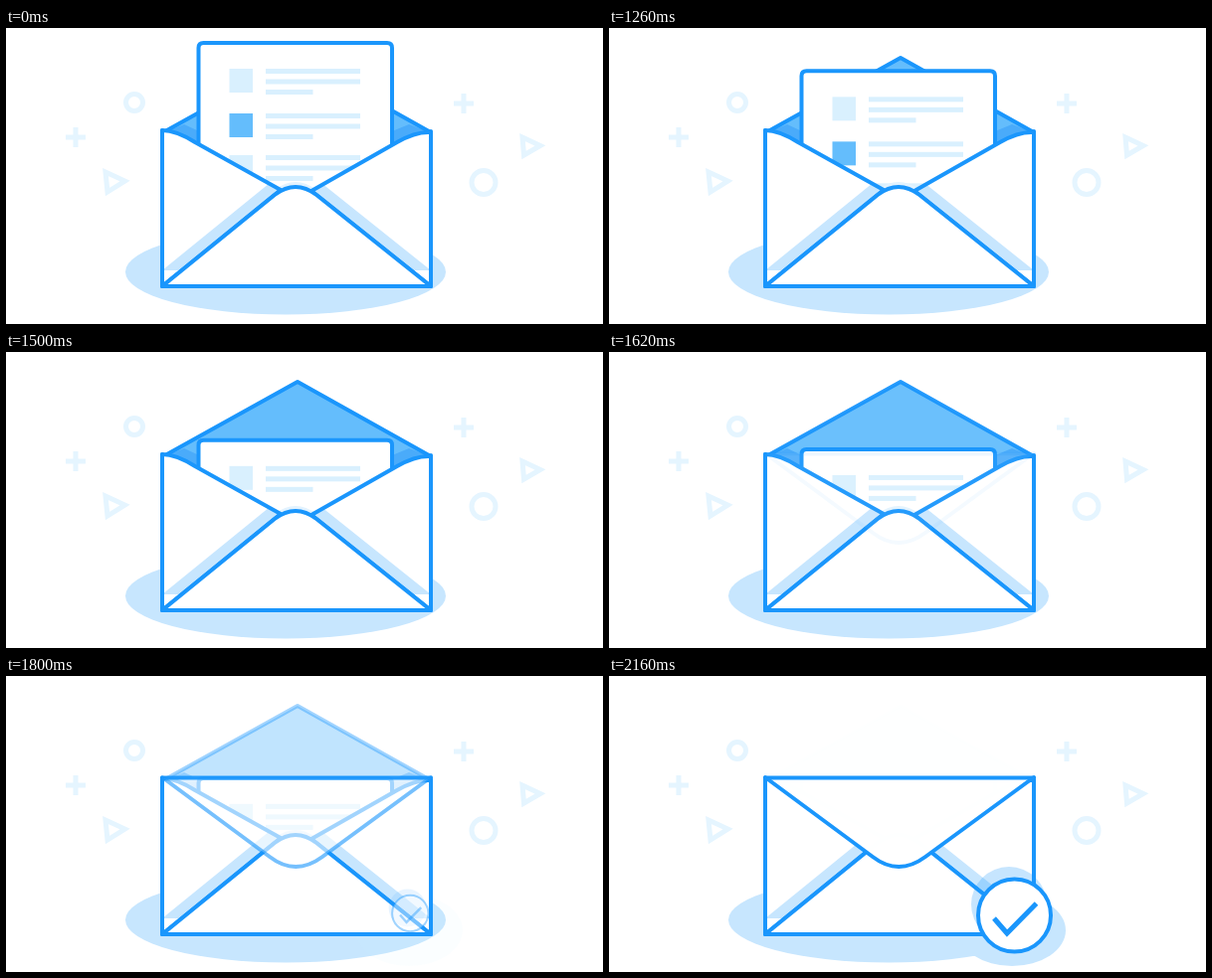
Animation, 600 px wide and 298 px high, one loop 3.06 s. Source, as an HTML page with a canvas:

```html
<!DOCTYPE html>
<html lang="en">
<head>
<meta charset="utf-8">
<title>Envelope</title>
<style>
html, body { margin: 0; width: 100%; height: 100%; overflow: hidden; background: #fff; }
canvas { display: block; width: 600px; height: 298px; }
</style>
</head>
<body>
<canvas id="stage" width="600" height="298"></canvas>
<script>
const ctx = document.getElementById('stage').getContext('2d');
const LOOP = 3060, STEP = 60;
const BLUE = '#1a96fc', MID = '#64bdfc', DEEP = '#4aabfa', SOFT = '#c7e6fe',
      PALE = '#d9f0fe', FAINT = '#e5f5ff', WHITE = '#fff';

// Fixed outlines
const back = new Path2D('M160 104 L293 30 L425 104');
const corners = new Path2D('M162 104 L179 97 L194 104 V120 Z M424 104 L405 97 L388 104 V120 Z');
const leftSide = new Path2D('M157 103 Q171 103 190 115 L276 163 L157 260');
const rightSide = new Path2D('M427 105 Q412 104 393 115 L307 164 L427 260');
const pocket = new Path2D('M157 260 L270 168 Q291 152 312 168 L427 260');
const body = new Path2D('M157 103 V260 H427 V104');
const lid = new Path2D('M157 102 L265 182 Q291 202 318 182 L427 102');
const tick = new Path2D('M387 244 L400 259 L429.5 229');

// CSS "ease" curve: cubic-bezier(.25, .1, .25, 1)
function ease(x) {
  if (x <= 0) return 0;
  if (x >= 1) return 1;
  let lo = 0, hi = 1;
  for (let i = 0; i < 24; i++) {
    const u = (lo + hi) / 2;
    const bx = 0.75 * u * (1 - u) + u * u * u;
    if (bx < x) lo = u; else hi = u;
  }
  return 0.3 * lo * (1 - lo) * (1 - lo) + 3 * lo * lo * (1 - lo) + lo * lo * lo;
}
const progress = (t, start, length) => ease((t - start) / length);

function fill(path, color) {
  ctx.fillStyle = color;
  ctx.fill(path);
}

function stroke(path, color = BLUE, width = 4) {
  ctx.strokeStyle = color;
  ctx.lineWidth = width;
  ctx.stroke(path);
}

function oval(x, y, rx, ry = rx) {
  const p = new Path2D();
  p.ellipse(x, y, rx, ry, 0, 0, Math.PI * 2);
  return p;
}

function decor() {
  ctx.lineJoin = 'miter';
  ctx.lineCap = 'butt';
  const shapes = [
    oval(129, 75, 8.5), oval(480, 155.5, 12),
    new Path2D('M60 110 H80 M70 100 V120'),
    new Path2D('M450 76 H470 M460 66 V86'),
    new Path2D('M100 145 L119.5 154 L102 165 Z'),
    new Path2D('M519 110 L537 118.5 L520.5 128 Z')
  ];
  shapes.forEach(s => stroke(s, FAINT, 5));
  ctx.lineJoin = ctx.lineCap = 'round';
}

function letter(top) {
  const sheet = new Path2D();
  sheet.moveTo(193.5, 200);
  sheet.lineTo(193.5, top + 5);
  sheet.quadraticCurveTo(193.5, top, 198.5, top);
  sheet.lineTo(383, top);
  sheet.quadraticCurveTo(388, top, 388, top + 5);
  sheet.lineTo(388, 200);
  fill(sheet, WHITE);
  ctx.save();
  ctx.clip(sheet);
  [26, 71, 113].forEach((dy, row) => {
    const y = top + dy;
    ctx.fillStyle = row === 1 ? MID : PALE;
    ctx.fillRect(224.5, y, 23.5, 24);
    ctx.fillStyle = PALE;
    [95, 95, 47.5].forEach((w, i) => ctx.fillRect(261, y + i * 10.5, w, 5));
  });
  ctx.restore();
  stroke(sheet);
}

function side(path) {
  fill(path, WHITE);
  ctx.save();
  ctx.clip(path);
  ctx.translate(0, -16);
  fill(pocket, SOFT);
  ctx.restore();
  stroke(path);
}

function badge(p) {
  const s = 0.15 + 0.85 * p;
  ctx.save();
  ctx.globalAlpha = p;
  ctx.translate(405, 237);
  ctx.scale(s, s);
  ctx.translate(-405, -237);
  fill(oval(402, 230, 38), 'rgba(30,150,250,.25)');
  const disc = oval(407.5, 241, 36.5);
  fill(disc, WHITE);
  stroke(disc);
  ctx.lineCap = 'butt';
  ctx.lineJoin = 'miter';
  stroke(tick, BLUE, 5);
  ctx.restore();
}

function draw(t) {
  const slide = progress(t, 1105, 732);
  const close = progress(t, 1580, 640);
  const pop = progress(t, 1700, 400);

  ctx.fillStyle = WHITE;
  ctx.fillRect(0, 0, 600, 298);
  decor();

  fill(oval(281, 245.5, 161, 43), SOFT);
  ctx.globalAlpha = pop ** 3;
  fill(oval(405, 256, 54, 36), SOFT);

  ctx.globalAlpha = 1 - close;
  fill(back, MID);
  fill(corners, DEEP);
  stroke(back);
  ctx.globalAlpha = 1;

  letter(15 + 88 * slide);

  // Pale shade of the pocket tip on the sheet
  ctx.save();
  ctx.translate(0, -5);
  fill(pocket, '#e2f2fe');
  ctx.restore();

  side(leftSide);
  side(rightSide);
  fill(pocket, WHITE);
  stroke(pocket);

  ctx.globalAlpha = close;
  fill(lid, WHITE);
  stroke(lid);
  ctx.globalAlpha = Math.min(1, close * 1.6);
  stroke(new Path2D('M157 102.5 H427'));
  ctx.globalAlpha = 1;
  stroke(body);

  if (pop > 0) badge(pop);
}

function frame(now) {
  const t = now % LOOP;
  draw(t < 1140 ? 0 : Math.min(2160, Math.floor(t / STEP) * STEP));
  requestAnimationFrame(frame);
}
draw(0);
requestAnimationFrame(frame);
</script>
</body>
</html>
```
